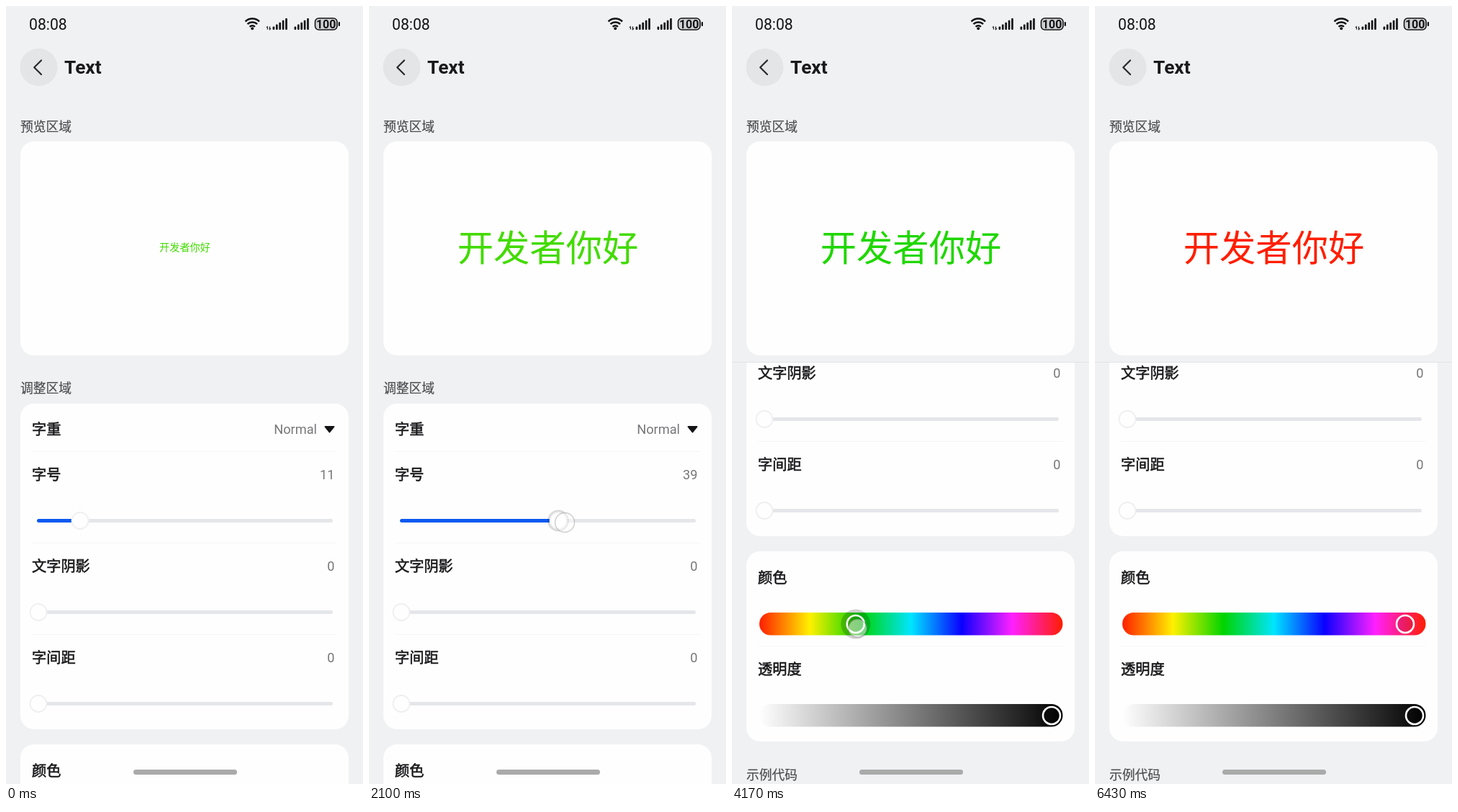
Recreate the animation shown at these times as an HTML page. Size 496 by 1080 pixels, loop 7010 ms.

```html
<!DOCTYPE html>
<html lang="zh-CN">
<head>
<meta charset="utf-8">
<title>Text</title>
<style>
  html, body { margin: 0; width: 100%; height: 100%; overflow: hidden; background: #f0f1f3; }
  svg { display: block; width: 100%; height: 100%; }
  text { font-family: Roboto, "Noto Sans CJK SC", "Noto Sans CJK", sans-serif; }
  .section { font-size: 17.8px; fill: #4c4d50; stroke: #4c4d50; stroke-width: .2; }
  .label { font-size: 20.2px; fill: #1a1a1c; stroke: #1a1a1c; stroke-width: .6; }
  .value { font-size: 18.2px; fill: #77777a; text-anchor: end; }
  .card { fill: #fefefe; }
  .rule { stroke: #f6f6f7; }
  .track { stroke: #e5e6e9; stroke-width: 5; stroke-linecap: round; }
  .thumb { fill: #fefefe; stroke: #efeff1; stroke-width: 1.8; }
  .ring { fill: #000; fill-opacity: .08; stroke: #fdfdfd; stroke-width: 2.6; }
</style>
</head>
<body>
<svg viewBox="0 0 496 1080" preserveAspectRatio="none">
  <defs>
    <clipPath id="pane"><rect y="494" width="496" height="586"/></clipPath>
    <linearGradient id="hue"></linearGradient>
    <linearGradient id="alpha">
      <stop offset="0" stop-color="#000" stop-opacity="0"/>
      <stop offset="1" stop-color="#000"/>
    </linearGradient>
  </defs>
  <rect width="496" height="1080" fill="#f0f1f3"/>

  <g id="status" fill="#141416">
    <text x="32" y="32.5" font-size="21.2">08:08</text>
    <g fill="none" stroke="#141416" stroke-width="2.5">
      <path d="M332.5 21.5a14 14 0 0 1 19.5 0M335.5 25.2a9.5 9.5 0 0 1 13.5 0M338.6 28.8a5 5 0 0 1 7.2 0"/>
    </g>
    <circle cx="342.2" cy="31.3" r="2"/>
    <path d="M363.5 27.5l-2.2 2.500h1.500v2.500h1.400zM366.5 33.500l2-2.500h-1.400v-2.500h-1.300v5z"/>
    <rect x="429.5" y="17" width="30.5" height="16" rx="5" fill="#cfd0d3" stroke="#141416" stroke-width="1.6"/>
    <rect x="461.8" y="22" width="2.2" height="6" rx="1"/>
    <text x="444.7" y="30.8" font-size="16" font-weight="700" text-anchor="middle">100</text>
  </g>

  <circle cx="45.5" cy="85" r="26" fill="#e4e5e7"/>
  <path d="M49 75.5L39.2 85.2L49 95" fill="none" stroke="#29292c" stroke-width="2.2" stroke-linecap="round" stroke-linejoin="round"/>
  <text x="81" y="94" font-size="26.3" font-weight="700" fill="#1a1a1c">Text</text>

  <text class="section" x="20" y="173.5">预览区域</text>
  <rect class="card" x="20" y="188" width="456" height="297" rx="19"/>
  <text id="sample" x="248.5" text-anchor="middle">开发者你好</text>

  <g clip-path="url(#pane)">
    <g id="list">
      <text class="section" x="20" y="536.7">调整区域</text>
      <rect class="card" x="20" y="552" width="456" height="452" rx="19"/>
      <text class="label" x="36" y="595">字重</text>
      <text class="value" x="432" y="594">Normal</text>
      <path d="M443.5 584h12l-6 7.5z" stroke="#141416" stroke-width="2" stroke-linejoin="round" fill="#141416"/>
      <rect class="card" x="20" y="1025" width="456" height="264" rx="19"/>
      <text class="label" x="36" y="1068.5">颜色</text>
      <text class="label" x="36" y="1195.5">透明度</text>
      <path class="rule" d="M36 1156.5H460"/>
      <rect x="38" y="1110" width="421.5" height="31.5" rx="15.75" fill="url(#hue)"/>
      <rect x="38" y="1237" width="421.5" height="31.5" rx="15.75" fill="url(#alpha)"/>
      <circle class="ring" cx="444" cy="1253" r="12"/>
      <circle id="halo" cy="1126" r="20.5" fill-opacity=".18"/>
      <circle id="ring" class="ring" cy="1126" r="12"/>
      <text class="section" x="20" y="1341.5">示例代码</text>
    </g>
  </g>
  <path id="edge" d="M0 494.5H496" stroke="#e1e2e5"/>
  <circle id="touch" fill="#fff" fill-opacity=".5" stroke="#999" stroke-opacity=".55" stroke-width="1.4"/>
  <rect x="177" y="1060" width="144" height="7" rx="3.5" fill="#aaa"/>
</svg>
<script>
const LOOP = 7010;
const $ = id => document.getElementById(id);

function add(parent, tag, attrs, text = '') {
  const el = document.createElementNS('http://www.w3.org/2000/svg', tag);
  set(el, attrs);
  el.textContent = text;
  return parent.appendChild(el);
}
function set(el, attrs) {
  for (const k in attrs) el.setAttribute(k, attrs[k]);
}

// Signal bars
for (const x of [370.5, 400.5])
  for (let i = 0; i < 5; i++) {
    const h = 4.5 + i * 2.9;
    add($('status'), 'rect', { x: x + i * 4.4, y: 33 - h, width: 2.7, height: h, rx: 1 });
  }

// Slider rows; each row starts with a faint rule
function slider(name, y, value, x) {
  const list = $('list');
  add(list, 'path', { class: 'rule', d: `M36 ${y - 31.5}H460` });
  add(list, 'text', { class: 'label', x: 36, y: y + 7.5 }, name);
  const label = add(list, 'text', { class: 'value', x: 456.5, y: y + 6.5 }, value);
  const cy = y + 64.5;
  add(list, 'path', { class: 'track', d: `M45.5 ${cy}H451.5` });
  const fill = add(list, 'path', { stroke: '#0a59f0', 'stroke-width': 5, 'stroke-linecap': 'round' });
  const press = add(list, 'circle', { cx: x, cy, r: 15, 'fill-opacity': .14, opacity: 0 });
  const thumb = add(list, 'circle', { class: 'thumb', cx: x, cy, r: 11.5 });
  return (v, px, pressed) => {
    label.textContent = v;
    set(fill, { d: `M45.5 ${cy}H${px}` });
    set(press, { cx: px, opacity: pressed });
    set(thumb, { cx: px });
  };
}
const setSize = slider('字号', 650, 11, 103);
slider('文字阴影', 777, 0, 45);
slider('字间距', 904, 0, 45);

// Hue bar
const HUES = [[255, 30, 0], [255, 240, 0], [0, 212, 0], [0, 229, 255], [10, 0, 255], [255, 32, 255], [255, 30, 0]];
HUES.forEach((c, i) => add($('hue'), 'stop', { offset: i / 6, 'stop-color': `rgb(${c})` }));

function hueAt(p) {
  const i = Math.min(5, Math.floor(p * 6)), f = p * 6 - i;
  return `rgb(${HUES[i].map((c, k) => Math.round(c + (HUES[i + 1][k] - c) * f))})`;
}

const clamp = v => Math.max(0, Math.min(1, v));
const fade = (t, a, b, c, d) => clamp((t - a) / (b - a)) * clamp((d - t) / (d - c));

// Smooth curve through [time, value] points, at rest at both ends
function curve(pts, t) {
  const n = pts.length - 1;
  if (t <= pts[0][0]) return pts[0][1];
  if (t >= pts[n][0]) return pts[n][1];
  let i = 0;
  while (t > pts[i + 1][0]) i++;
  const slope = k => k === 0 || k === n ? 0 : (pts[k + 1][1] - pts[k - 1][1]) / (pts[k + 1][0] - pts[k - 1][0]);
  const [t0, a] = pts[i], [t1, b] = pts[i + 1];
  const h = t1 - t0, u = (t - t0) / h, u2 = u * u, u3 = u2 * u;
  return a + (b - a) * (3 * u2 - 2 * u3) + h * (slope(i) * (u3 - 2 * u2 + u) + slope(i + 1) * (u3 - u2));
}

const SIZE_X = [[920, 103], [1500, 218], [1900, 263]];
const SIZE = [[920, 11], [1500, 32], [1900, 39]];
const HUE_X = [[4020, 162], [4730, 283], [5300, 380], [5570, 401], [6060, 431]];
const HUE = [[4020, .29], [4730, .58], [5300, .84], [5570, .895], [6060, 1]];
const HUE_GAP = [[4020, 2], [4730, 8], [5570, 2]];
const HUE_TOUCH_Y = [[4020, 864], [4730, 863], [5570, 858]];

function touchAt(t, scroll) {
  if (t < 2500) return [curve(SIZE_X, t) + 9, 717, 13.5, fade(t, 870, 930, 2080, 2250)];
  if (t < 3500) return [293.5, 886 - scroll, 14, fade(t, 2690, 2720, 2900, 2960)];
  return [curve(HUE_X, t) + curve(HUE_GAP, t), curve(HUE_TOUCH_Y, t), 12.5, fade(t, 3970, 4030, 6150, 6300)];
}

function draw(t) {
  const size = Math.round(curve(SIZE, t)), px = size * 1.29;
  const scroll = 268 * (1 - (1 - clamp((t - 2700) / 500)) ** 1.75);
  const hx = curve(HUE_X, t);

  setSize(size, curve(SIZE_X, t), fade(t, 870, 970, 2100, 2290));
  set($('sample'), { 'font-size': px, y: 335 + px * .37, fill: hueAt(curve(HUE, t)) });
  set($('list'), { transform: `translate(0 ${-scroll})` });
  set($('edge'), { opacity: scroll > 0 ? 1 : 0 });
  set($('ring'), { cx: hx });
  set($('halo'), { cx: hx, opacity: fade(t, 3970, 4070, 6170, 6420) });

  const [cx, cy, r, opacity] = touchAt(t, scroll);
  set($('touch'), { cx, cy, r, opacity });
}

const start = performance.now();
function tick() {
  draw((performance.now() - start) % LOOP);
  requestAnimationFrame(tick);
}
draw(0);
requestAnimationFrame(tick);
</script>
</body>
</html>
```
